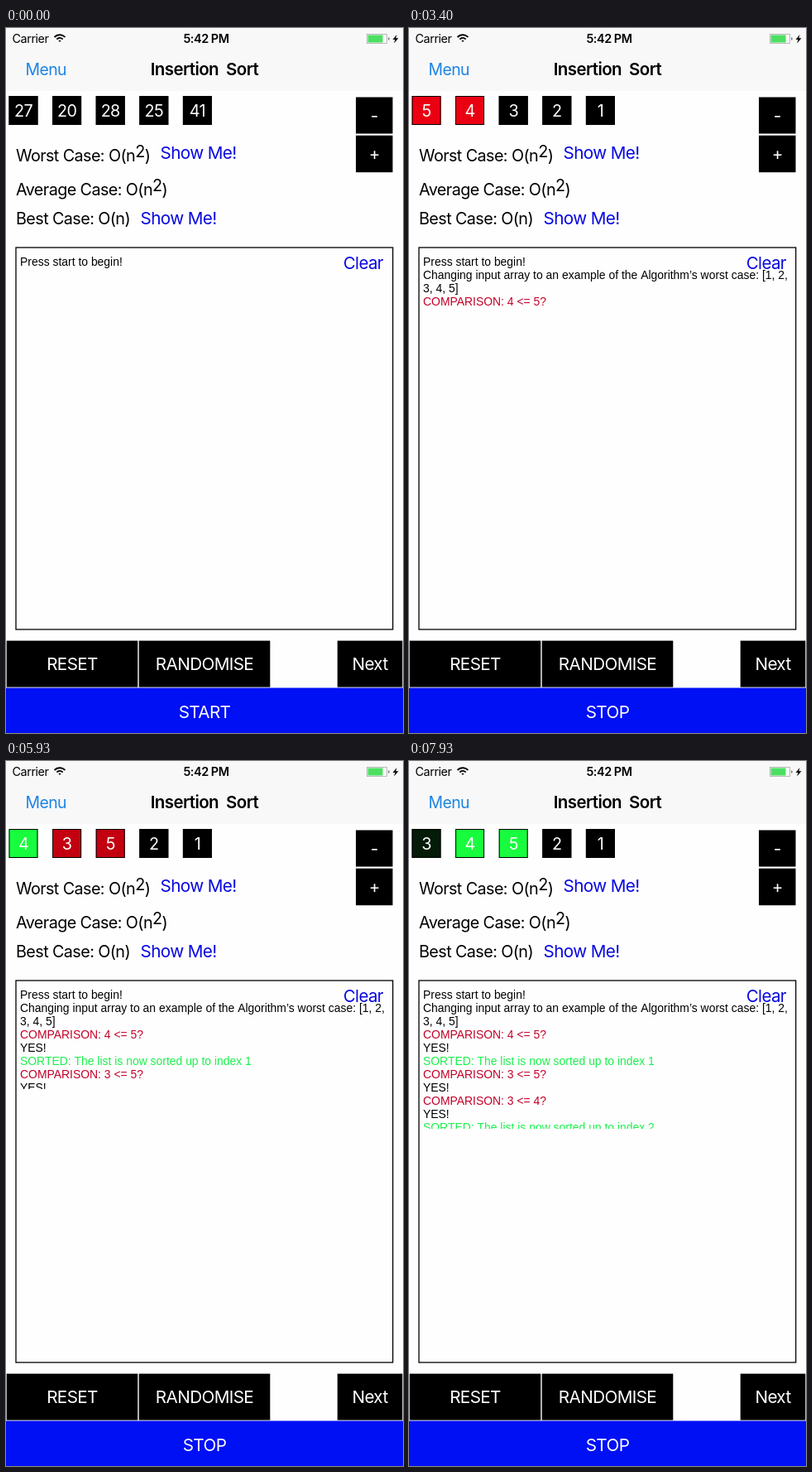
An HTML page with a canvas that plays this animation: 480x851 px, repeating every 8000 ms.

```html
<!DOCTYPE html>
<html lang="en">
<head>
<meta charset="utf-8">
<title>Insertion Sort</title>
<style>
  html, body { margin: 0; width: 100%; height: 100%; overflow: hidden; background: #fff; }
  canvas { display: block; width: 480px; height: 851px; }
</style>
</head>
<body>
<canvas id="stage"></canvas>
<script>
const LOOP = 8000, FADE = 250, SWAP = 500;
const EXAMPLE_AT = 1000, START_AT = 2800;
const BLACK = [0, 0, 0], RED = [235, 0, 18], GREEN = [24, 252, 62];
const LINK = '#0808e0', LOG_RED = '#c40028', LOG_GREEN = '#1cf04c';
const UI = 'Inter, Roboto, sans-serif';
const LOG = '"Liberation Sans", Arial, sans-serif';

const canvas = document.getElementById('stage');
const scale = window.devicePixelRatio || 1;
canvas.width = 480 * scale;
canvas.height = 851 * scale;
const ctx = canvas.getContext('2d');

const clamp = p => Math.max(0, Math.min(1, p));
const ease = p => (1 - Math.cos(Math.PI * clamp(p))) / 2;
const slotX = slot => 3.5 + 52.6 * slot;

// Timeline, filled in chronological order.
const fades = [], moves = [], log = [];
const say = (time, text, color = '#000', late = 0) => log.push({ time, text, color, late });
const fade = (time, value, color) => fades.push({ time, value, color });

function compareAndSwap(time, left, right, slot, sortedIndex) {
  say(time - 30, `COMPARISON: ${right} <= ${left}?`, LOG_RED);
  fade(time, left, RED);
  fade(time, right, RED);
  moves.push({ time: time + 290, value: left, slot: slot + 1 });
  moves.push({ time: time + 290, value: right, slot });
  say(time + 810, 'YES!', '#000', 100);
  fade(time + 810, left, BLACK);
  fade(time + 810, right, BLACK);
  fade(time + 1070, left, GREEN);
  if (sortedIndex) {
    say(time + 1330, `SORTED: The list is now sorted up to index ${sortedIndex}`, LOG_GREEN, 100);
    fade(time + 1330, right, GREEN);
  }
}

say(0, 'Press start to begin!');
say(EXAMPLE_AT, 'Changing input array to an example of the Algorithm\u2019s worst case: [1, 2,');
say(EXAMPLE_AT, '3, 4, 5]');
compareAndSwap(3100, 5, 4, 0, 1);
compareAndSwap(5078, 5, 3, 1);
compareAndSwap(6574, 4, 3, 0, 2);

function text(str, x, y, size, color = '#000', align = 'left', weight = 400) {
  ctx.font = `${weight} ${size}px ${UI}`;
  ctx.letterSpacing = `${-0.03 * size}px`;
  ctx.textAlign = align;
  ctx.fillStyle = color;
  ctx.fillText(str, x, y);
  return x + ctx.measureText(str).width;
}

function box(x, y, w, h, color) {
  ctx.fillStyle = color;
  ctx.fillRect(x, y, w, h);
}

function button(label, x, y, w, h, color = '#000') {
  box(x, y, w, h, color);
  text(label, x + w / 2, y + h / 2 + 7.3, 20.7, '#fff', 'center');
}

function squared(label, y) {
  let x = text(label, 12, y, 19.8);
  x = text('2', x, y - 4.5, 19.8);
  text(')', x, y, 19.8);
}

function polygon(points, color) {
  ctx.fillStyle = color;
  ctx.beginPath();
  points.forEach(([x, y]) => ctx.lineTo(x, y));
  ctx.fill();
}

function drawStatusBar() {
  text('Carrier', 7.5, 18, 14.4);
  text('5:42 PM', 242, 18, 14.4, '#000', 'center', 600);

  ctx.strokeStyle = '#000';
  ctx.lineWidth = 1.9;
  for (const radius of [1.2, 5, 8.8]) {
    ctx.beginPath();
    ctx.arc(65, 17, radius, -Math.PI * 0.76, -Math.PI * 0.24);
    ctx.stroke();
  }

  ctx.strokeStyle = '#aaa';
  ctx.lineWidth = 0.8;
  ctx.strokeRect(436.5, 7.5, 24, 11);
  box(437.5, 8.5, 18, 9, '#4cdf62');
  box(462, 11.5, 1.5, 3, '#777');
  polygon([[472.5, 8], [467.5, 14], [470.5, 14], [469, 18.5], [474.5, 12.3], [471.3, 12.3]], '#000');
}

function drawChrome(time) {
  box(0, 0, 480, 851, '#fefefe');
  box(0, 0, 480, 76, '#f8f8f8');
  drawStatusBar();
  text('Menu', 23.5, 57, 19.4, '#1c84e4');
  text('Insertion  Sort', 240, 57, 20.5, '#000', 'center', 600);

  button('-', 423, 83.5, 44.5, 44);
  button('+', 423, 129.7, 44.5, 44.5);
  squared('Worst Case: O(n', 160.5);
  squared('Average Case: O(n', 201.5);
  text('Best Case: O(n)', 12, 237, 19.8);
  text('Show Me!', 186.5, 157.5, 20.7, LINK);
  text('Show Me!', 162.5, 236.5, 20.7, LINK);

  ctx.strokeStyle = '#000';
  ctx.lineWidth = 1.3;
  ctx.strokeRect(12, 265, 455.7, 461);

  button('RESET', 0.7, 739.6, 158.6, 56);
  button('RANDOMISE', 160.7, 739.6, 158.6, 56);
  button('Next', 400.7, 739.6, 78.6, 56);
  button(time < START_AT ? 'START' : 'STOP', 0, 796.5, 480, 58, '#0010f5');
}

function drawCell(label, x, color) {
  box(x, 82, 35, 35, `rgb(${color.map(Math.round)})`);
  ctx.strokeStyle = '#000';
  ctx.lineWidth = 1;
  ctx.strokeRect(x + 0.5, 82.5, 34, 34);
  text(label, x + 17.5, 107, 19.8, '#fff', 'center');
}

function drawCells(time) {
  if (time < EXAMPLE_AT) {
    [27, 20, 28, 25, 41].forEach((value, i) => drawCell(value, slotX(i), BLACK));
    return;
  }
  for (let value = 5; value > 0; value--) {
    let x = slotX(5 - value), color = BLACK;
    for (const move of moves) {
      if (move.value === value) x += (slotX(move.slot) - x) * ease((time - move.time) / SWAP);
    }
    for (const step of fades) {
      if (step.value !== value) continue;
      const p = clamp((time - step.time) / FADE);
      color = color.map((c, i) => c + (step.color[i] - c) * p);
    }
    drawCell(value, x, color);
  }
}

function drawLog(time) {
  ctx.font = `13.93px ${LOG}`;
  ctx.letterSpacing = '0px';
  ctx.textAlign = 'left';
  log.forEach((line, i) => {
    if (time < line.time) return;
    const y = 287 + 16 * i;
    ctx.save();
    ctx.beginPath();
    // A fresh line is briefly cut off at the bottom.
    ctx.rect(13, y - 14, 454, time < line.time + line.late ? 11 : 19);
    ctx.clip();
    ctx.fillStyle = line.color;
    ctx.fillText(line.text, 17, y);
    ctx.restore();
  });
  text('Clear', 407.7, 291.3, 20.5, LINK);
}

function render(now) {
  const time = now % LOOP;
  ctx.setTransform(scale, 0, 0, scale, 0, 0);
  drawChrome(time);
  drawCells(time);
  drawLog(time);
  requestAnimationFrame(render);
}
render(performance.now());
</script>
</body>
</html>
```
